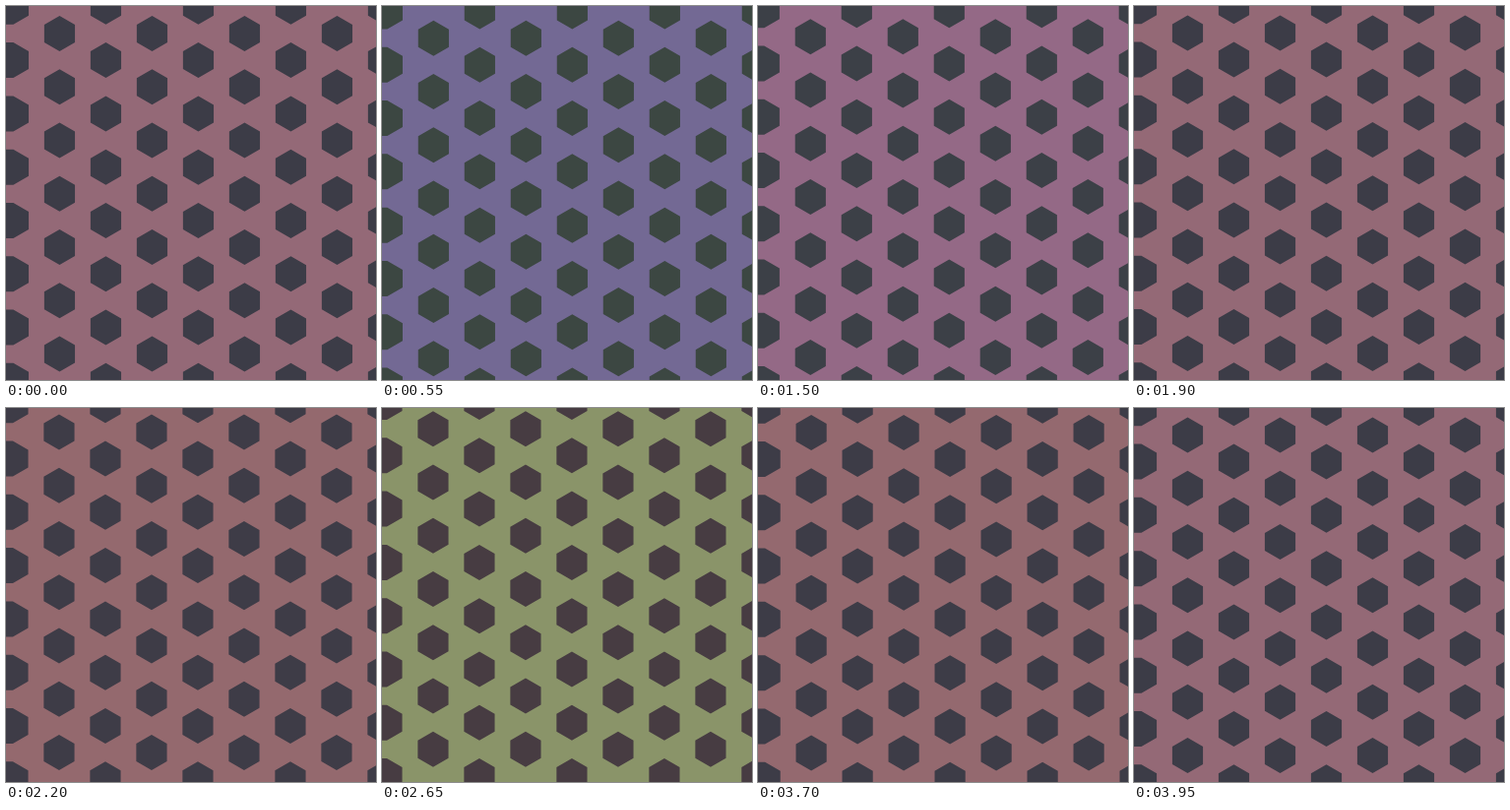
Recreate the animation shown at these times as an HTML page with a canvas. Size 376x380 px, loop 4 s.

```html
<!DOCTYPE html>
<html lang="en">
<head>
<meta charset="utf-8">
<title>Swaying hexagons</title>
<style>
  html, body { margin: 0; width: 100%; height: 100%; overflow: hidden; background: #93687d; }
  canvas { display: block; width: 376px; height: 380px; }
</style>
</head>
<body>
<canvas id="stage" width="376" height="380"></canvas>
<script>
const W = 376, H = 380, LOOP = 4000, STEP = 50, PEAK = 925;
const COL = 47, ROW = COL * 2 / Math.sqrt(3), RADIUS = 18;
const ctx = document.getElementById('stage').getContext('2d');

function smoothstep(from, to, v) {
  const x = Math.min(1, Math.max(0, (v - from) / (to - from)));
  return x * x * (3 - 2 * x);
}

// Drifts gently around pink, turns quickly to violet or green near the ends.
function hueAt(swing) {
  return 343 - 22 * swing - 70 * Math.sign(swing) * smoothstep(.56, .8, Math.abs(swing));
}

function hexagon(x, y) {
  for (let i = 0; i < 6; i++) {
    const a = Math.PI * (i / 3 + .5);
    const px = x + RADIUS * Math.cos(a), py = y + RADIUS * Math.sin(a);
    i ? ctx.lineTo(px, py) : ctx.moveTo(px, py);
  }
  ctx.closePath();
}

function draw(ms) {
  const t = Math.floor(ms % LOOP / STEP) * STEP;
  const swing = Math.cos((t - PEAK) / LOOP * 2 * Math.PI);
  const hue = hueAt(swing);
  const x0 = 54.5 - 3.1 * swing * swing;
  const y0 = 27.2 + 6.6 * swing;

  ctx.fillStyle = `hsl(${hue}, 17%, 49.5%)`;
  ctx.fillRect(0, 0, W, H);
  ctx.fillStyle = `hsl(${hue - 103}, 8.5%, 25.7%)`;
  ctx.beginPath();
  for (let c = -1; c < 8; c++) {
    const x = x0 + c * COL;
    const shift = c % 2 ? ROW / 2 : 0;
    for (let r = -1; r < 8; r++) {
      const y = y0 + r * ROW + shift;
      hexagon(x, y);
      // the first column runs on to the stage edge at full height
      if (c < 0) ctx.rect(0, y - RADIUS, x, 2 * RADIUS);
    }
  }
  ctx.fill();
}

const start = performance.now();
function tick(now) {
  draw(Math.max(0, now - start));
  requestAnimationFrame(tick);
}
draw(0);
requestAnimationFrame(tick);
</script>
</body>
</html>
```
